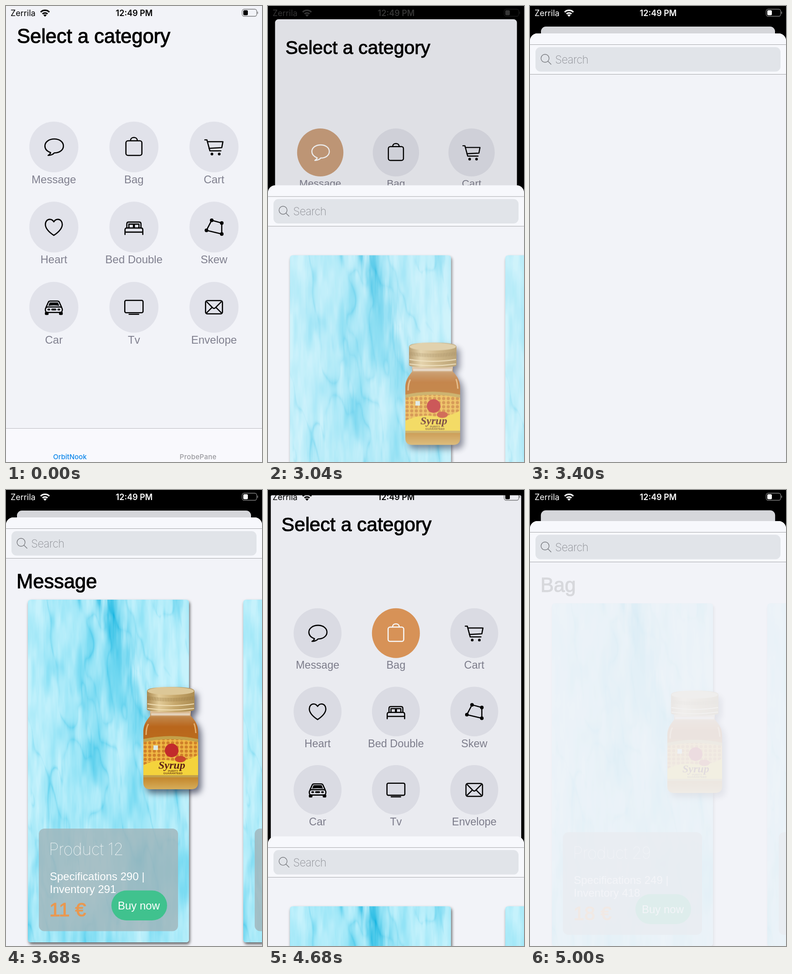
Animation of 561x998 px, one loop 5.08 s. Source, as an HTML page with a canvas:

```html
<!DOCTYPE html>
<html lang="en">
<head>
<meta charset="utf-8">
<title>Category picker</title>
<style>
  html, body { margin: 0; width: 100%; height: 100%; overflow: hidden; background: #000; }
  #stage { position: absolute; left: 0; top: 0; width: 561px; height: 998px; overflow: hidden; background: #000; }
  #home, #dim, #sheet, #content, svg { position: absolute; left: 0; top: 0; width: 561px; height: 998px; }
  #home { transform-origin: 50% 0; overflow: hidden; background: #f2f3f8; }
  #dim { background: #000; }
  #sheet { overflow: hidden; border-radius: 16px 16px 0 0; background: #f2f3f8; }
  canvas { position: absolute; top: 180px; border-radius: 6px; box-shadow: 2px 4px 6px rgba(0,0,0,.6); }
  text { font-family: "Liberation Sans", Arial, sans-serif; font-size: 24px; }
  .title { font-size: 43.5px; stroke: #000; stroke-width: 1.1px; }
  .label { fill: #80808f; text-anchor: middle; }
  .ui { font-family: Inter, sans-serif; }
  .status { font-size: 18px; fill: currentColor; }
  .tab { font-size: 15px; font-weight: 500; text-anchor: middle; }
  .icon { fill: none; stroke: currentColor; stroke-width: 2.6; stroke-linejoin: round; stroke-linecap: round; }
  .solid { fill: currentColor; stroke: none; }
  #jar { filter: drop-shadow(7px 9px 7px rgba(20,25,50,.6)); }
</style>
</head>
<body>
<div id="stage">
  <div id="home"><svg id="grid"></svg><div id="dim"></div></div>

  <svg id="status">
    <text class="ui status" x="10" y="22">Zerrila</text>
    <g class="icon">
      <path d="M76 13.3A13.5 13.5 0 0 1 95 13.3M80 17.3A8 8 0 0 1 91 17.3" style="stroke-linecap:butt;stroke-width:3.3"/>
      <path class="solid" d="M85.5 23.5L81.8 19.7A5.3 5.3 0 0 1 89.2 19.7Z"/>
      <rect x="517.5" y="7" width="32" height="15.5" rx="4.5" style="stroke-width:1.3;opacity:.5"/>
      <rect class="solid" x="520" y="9.3" width="10" height="11" rx="2.5"/>
      <path d="M551.5 13V16.5" style="stroke-width:1.5;opacity:.5"/>
    </g>
    <text class="ui status" x="281" y="22" text-anchor="middle" font-weight="600">12:49 PM</text>
  </svg>

  <div id="sheet">
    <svg>
      <rect width="561" height="89" fill="#f7f8fc"/>
      <path d="M0 24.5H561M0 89.5H561" stroke="#a5a6aa"/>
      <rect x="12" y="30" width="537" height="53.5" rx="11" fill="#e1e4e9"/>
      <g fill="none" stroke="#77797e" stroke-width="1.4">
        <circle cx="33" cy="54.5" r="8.8"/><path d="M39.5 61L46.5 68"/>
      </g>
      <text class="ui" x="55" y="65.5" fill="#8f9197" font-weight="200" style="letter-spacing:-.7px">Search</text>
    </svg>
    <div id="content">
      <canvas id="marble" width="353" height="750" style="left:48px"></canvas>
      <canvas id="marble2" width="353" height="750" style="left:520px"></canvas>
      <svg><g transform="translate(0 -60)">
        <text class="title" id="heading" x="23" y="215"></text>
        <g fill="#a0b4ba" fill-opacity=".8">
          <rect x="72" y="741" width="305" height="224.5" rx="12"/>
          <rect x="545" y="741" width="305" height="224.5" rx="12"/>
        </g>
        <g fill="#fff">
          <text class="ui" id="product" x="94" y="799" font-weight="100" style="font-size:36px;letter-spacing:-.6px"></text>
          <text id="specs" x="96" y="854"></text>
          <text id="stock" x="96" y="882"></text>
          <text id="price" x="95" y="933" fill="#e99850" stroke="#e99850" stroke-width="1.2" style="font-size:43px"></text>
          <rect x="231" y="876.5" width="122" height="65.5" rx="32.7" fill="#40c28e"/>
          <text x="245" y="917.5">Buy now</text>
        </g>
        <g id="jar"></g>
      </g></svg>
    </div>
  </div>
</div>

<script>
const LOOP = 5080, STEP = 40;
const $ = id => document.getElementById(id);
const clamp = v => Math.max(0, Math.min(1, v));
const ramp = (v, from, to) => clamp((v - from) / (to - from));
const smooth = v => v * v * (3 - 2 * v);
const mix = (a, b, k) => a.map((v, i) => v + (b[i] - v) * k);
const rgb = c => `rgb(${c.map(Math.round)})`;

// Icons are drawn around the centre of their button.
const dot = (x, y, r) => `<circle class="solid" cx="${x}" cy="${y}" r="${r}"/>`;
const box = (x, y, w, h, r, cls = '') => `<rect class="${cls}" x="${x}" y="${y}" width="${w}" height="${h}" rx="${r}"/>`;
const line = (d, cls = '') => `<path class="${cls}" d="${d}"/>`;
const corners = [[-5, -15], [17, -9], [17, 15], [-16.5, 7]];

const categories = [
  ['Message', line('M-7 12.5C-15 9.5-19.5 4.5-19.5-2C-19.5-11-10.5-17.5 1-17.5S21-11 21-2 12 13 1 13C-1 16-7 18.5-12.5 18.5C-10 17-7.5 15-7 12.5Z')],
  ['Bag', box(-17.5, -13.5, 35, 32, 4.5) + line('M-7.5-14C-7.5-23 7.5-23 7.5-14')],
  ['Cart', line('M-20-15.5H-15.5L-9 8.5H15M-14-11.5H19.5L17 1.5-11 3') + dot(-4.5, 15.5, 3) + dot(11.5, 15.5, 3)],
  ['Heart', line('M0 18C-9 12-18.5 4-18.5-6C-18.5-12-14.5-17-9-17C-5-17-2-15 0-11.5C2-15 5-17 9-17C14.5-17 18.5-12 18.5-6C18.5 4 9 12 0 18Z')],
  ['Bed Double', line('M-15.5 1V-7Q-15.5-11-11.5-11H11.5Q15.5-11 15.5-7V1M-19.5 16V6Q-19.5 2-15.5 2H15.5Q19.5 2 19.5 6V16M-19.5 11H19.5M-11 1V-6.5H-1V1M1 1V-6.5H11V1')],
  ['Skew', line(`M${corners.join('L')}Z`) + corners.map(([x, y]) => dot(x, y, 4)).join('')],
  ['Car', line('M-17 0L-12-11Q-11-13.5-8-13.5H8Q11-13.5 12-11L17 0') + line('M-12-3L-9-10.5H9L12-3Q0-5-12-3Z', 'solid') +
    box(-18.5, -.5, 37, 12, 5) + box(-14, 3, 6, 4, 2, 'solid') + box(8, 3, 6, 4, 2, 'solid') +
    box(-5.5, 3, 11, 4, 2, 'solid') + box(-19.5, 10, 8, 7, 2, 'solid') + box(11.5, 10, 8, 7, 2, 'solid')],
  ['Tv', box(-20, -15, 40, 27, 3) + line('M-10.5 15.5H10.5')],
  ['Envelope', box(-18.5, -14.5, 37, 29, 4) + line('M-17-13L-3 1Q0 4 3 1L17-13M-17 13L-5 1M17 13L5 1')],
];

$('grid').innerHTML = '<text class="title" x="24" y="80.5">Select a category</text>' +
  categories.map(([name, icon], i) => {
    const x = 104.8 + (i % 3) * 175.5, y = 308.5 + Math.floor(i / 3) * 175.4;
    return `<g class="category" transform="translate(${x} ${y})"><ellipse rx="53.7" ry="55.6"/>
      <g class="icon">${icon}</g><text class="label" y="79.5">${name}</text></g>`;
  }).join('') +
  `<rect y="924" width="561" height="74" fill="#f9f9fd"/><path d="M0 924.5H561" stroke="#b9b9be"/>
   <text class="ui tab" x="140" y="992" fill="#0c86ea">OrbitNook</text>
   <text class="ui tab" x="421" y="992" fill="#98989d" letter-spacing=".3">ProbePane</text>`;
const buttons = [...document.querySelectorAll('.category')];

$('jar').innerHTML = `
  <defs>
    <linearGradient id="amber" x2="0" y2="1">
      <stop stop-color="#e0c7a5"/><stop offset=".08" stop-color="#c08548"/>
      <stop offset=".2" stop-color="#b9661c"/><stop offset=".8" stop-color="#bd7a1d"/><stop offset="1" stop-color="#d6ad5a"/>
    </linearGradient>
    <linearGradient id="lid">
      <stop stop-color="#a8874f"/><stop offset=".25" stop-color="#e2cb98"/>
      <stop offset=".6" stop-color="#c6a76b"/><stop offset="1" stop-color="#ab8c52"/>
    </linearGradient>
    <pattern id="comb" width="10" height="9" patternUnits="userSpaceOnUse">
      <rect width="10" height="9" fill="#efb744"/><circle cx="5" cy="4.5" r="3.5" fill="#d0812a"/>
    </pattern>
  </defs>
  <path d="M316 484H405V494C411 502 421 510 421 530V640Q421 655 406 655H316Q301 655 301 640V530C301 510 311 502 316 494Z" fill="url(#amber)"/>
  <path d="M318 491H403" stroke="#e9ddcc" stroke-width="5" opacity=".8"/>
  <path d="M312 512Q307 520 307 536M412 511Q415 518 416 532" fill="none" stroke="#e2ad6b" stroke-width="3"/>
  <path d="M301 545Q361 532 421 545V629H301Z" fill="#c3a14a"/>
  <path d="M301 552Q361 539 421 552V624H301Z" fill="url(#comb)"/>
  <path d="M301 602Q330 588 361 592T421 580V624H301Z" fill="#f4d33c"/>
  <ellipse cx="382" cy="589" rx="12" ry="7" fill="#c9472c"/>
  <rect x="323" y="559" width="10" height="10" fill="#dce8e0"/>
  <circle cx="363" cy="570" r="15" fill="#c22b2b"/>
  <text x="334" y="610" fill="#5d2017" style="font:italic bold 24px 'Liberation Serif',serif">Syrup</text>
  <g fill="#70401b" text-anchor="middle" font-weight="bold">
    <text x="366" y="616.5" style="font-size:6px">PURITY</text><text x="366" y="622" style="font-size:6px">GUARANTEED</text>
  </g>
  <path d="M309 440Q309 431 361 431T413 440V480Q413 486 361 486T309 480Z" fill="url(#lid)"/>
  <ellipse cx="361" cy="440" rx="51" ry="8.5" fill="#dcc797"/>
  <path d="M310 455Q361 463 412 455" fill="none" stroke="#92733e" stroke-width="8" stroke-dasharray="1.5 2" opacity=".6"/>
  <path d="M310 468Q361 476 412 468M310 478Q361 485 412 478" fill="none" stroke="#f1dfb5" stroke-width="2"/>`;

// Vertically streaked blue marble from layered value noise.
function paintMarble() {
  const hash = (x, y) => { const s = Math.sin(x * 127.1 + y * 311.7) * 43758.5453; return s - Math.floor(s); };
  const noise = (x, y) => {
    const i = Math.floor(x), j = Math.floor(y), u = smooth(x - i), v = smooth(y - j);
    const top = hash(i, j) + (hash(i + 1, j) - hash(i, j)) * u;
    const low = hash(i, j + 1) + (hash(i + 1, j + 1) - hash(i, j + 1)) * u;
    return top + (low - top) * v;
  };
  const layered = (x, y) => noise(x, y) * .5 + noise(x * 2.1, y * 2.1) * .3 + noise(x * 4.3, y * 4.3) * .2;
  const canvas = $('marble'), ctx = canvas.getContext('2d');
  const { width, height } = canvas, image = ctx.createImageData(width, height);
  for (let y = 0; y < height; y++) for (let x = 0; x < width; x++) {
    const wash = layered(x / 48, y / 150 + 9);
    const streak = layered(x / 11 + 70, y / 85);
    const vein = Math.pow(1 - Math.abs(layered(x / 60 + 40 - y / 500, y / 210) - .5) * 2, 14);
    const offset = (x - 172 - y * .3) / 24;
    const band = Math.exp(-offset * offset - y / 240) * streak;
    const blue = clamp(vein * streak * .45 + band * .9 + (wash - .55) * .5);
    const tint = mix([198, 242, 252], [132, 223, 244], clamp(wash * 1.4 + streak * .7 - .6));
    image.data.set([...mix(tint, [20, 180, 224], blue), 255], (y * width + x) * 4);
  }
  ctx.putImageData(image, 0, 0);
  $('marble2').getContext('2d').drawImage(canvas, 0, 0);
}

// Each tap opens the sheet after a short lag; its items fade in once loaded.
const taps = [
  { start: 2880, lag: 39.5, loadAt: 550, button: 0, product: 12, specs: 290, stock: 291, price: 11 },
  { start: 4600, lag: 26.5, loadAt: 350, button: 1, product: 29, specs: 249, stock: 418, price: 18 },
];

// Critically damped spring from 0 to 1.
function spring(ms) {
  if (ms >= 480) return 1;
  const x = Math.max(0, ms) * .01826;
  return 1 - (1 + x) * Math.exp(-x);
}

function render(time) {
  const t = Math.floor((time % LOOP) / STEP) * STEP;
  const tap = taps[t < 4280 ? 0 : 1], age = t - tap.start, open = spring(age - tap.lag);

  $('home').style.transform = `translateY(${45 * open}px) scale(${1 - .0856 * open})`;
  $('home').style.borderRadius = `${12 * open}px`;
  $('dim').style.opacity = .12 * open;
  $('status').style.color = rgb(mix([0, 0, 0], [255, 255, 255], ramp(age, 110, 350)));
  buttons.forEach((button, i) => {
    const active = age >= 0 && i === tap.button;
    button.style.color = active ? '#fff' : '#000';
    button.firstChild.style.fill = active ? rgb(mix([231, 145, 72], [196, 168, 145], ramp(age, 40, 200))) : '#e1e2ea';
  });

  $('sheet').style.transform = `translateY(${998 - 938 * open}px)`;
  $('sheet').style.visibility = open > 0 ? 'visible' : 'hidden';
  const loaded = age > 320, items = loaded ? tap : taps[0];
  $('content').style.opacity = loaded ? smooth(ramp(age, tap.loadAt, tap.loadAt + 240)) : 1 - ramp(age, 120, 300);
  $('content').style.transform = `translateY(${loaded ? 0 : -27}px)`;
  $('heading').textContent = loaded ? categories[tap.button][0] : '';
  $('product').textContent = `Product ${items.product}`;
  $('specs').textContent = `Specifications ${items.specs} |`;
  $('stock').textContent = `Inventory ${items.stock}`;
  $('price').textContent = `${items.price} €`;
}

paintMarble();
const begin = performance.now();
(function tick() {
  render(performance.now() - begin);
  requestAnimationFrame(tick);
})();
</script>
</body>
</html>
```
